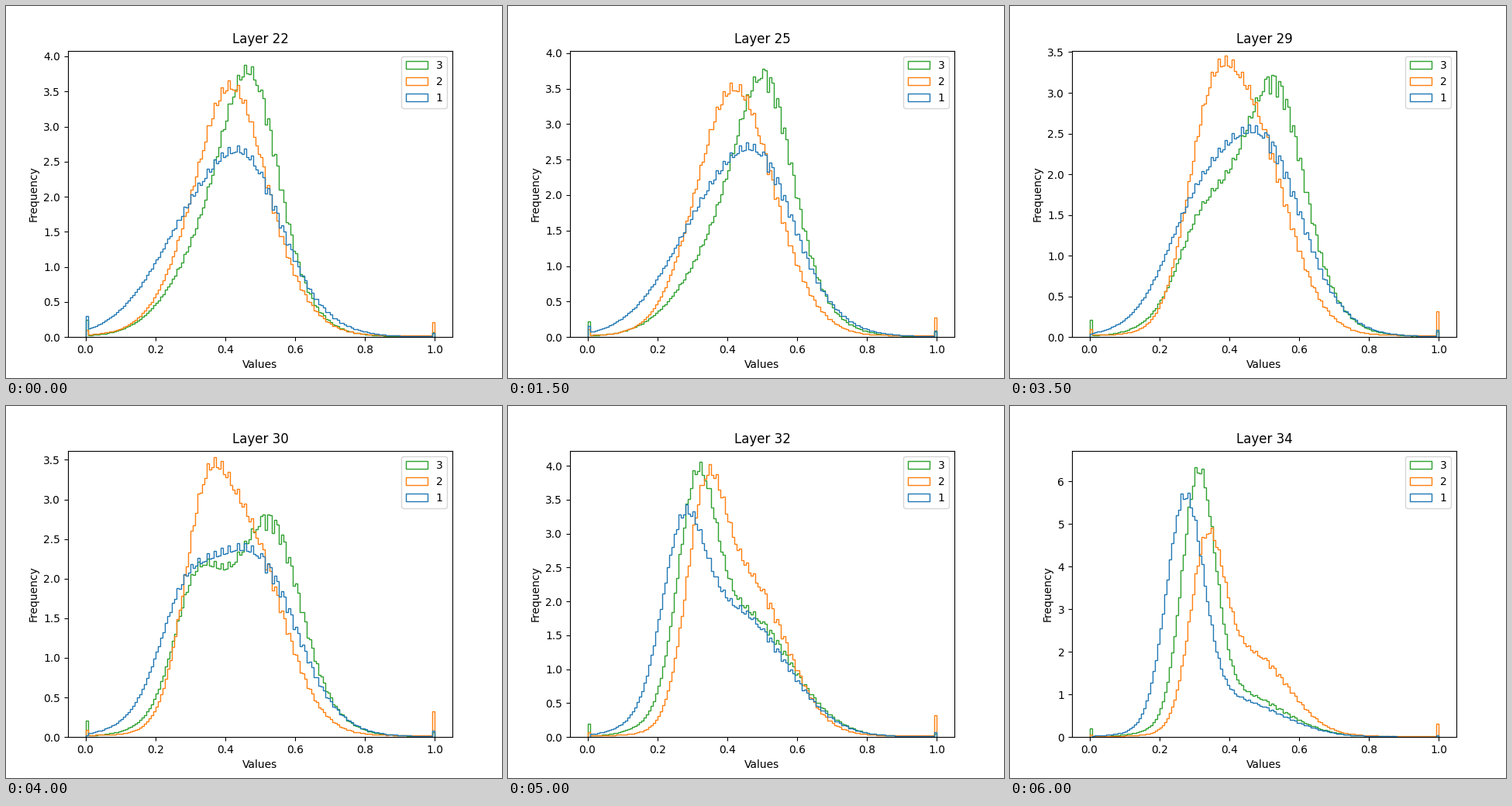
A matplotlib script that plays this animation: 640x480 px, repeating every 6.5 s.

```python
import numpy as np
import matplotlib.pyplot as plt
from matplotlib.animation import FuncAnimation

BINS = 150
MIDS = (np.arange(BINS) + 0.5) / BINS
FIRST, MIDDLE, LAST = 22, 28, 34

# Upper limit of the y axis at a few layers
TOP_LAYERS = [22, 24, 27, 29, 30, 32, 34]
TOPS = [4.081, 4.071, 3.962, 3.518, 3.616, 4.224, 6.726]

# Each series mixes a sharp early bump, a broad bump and a late bump.
# Triples hold a value at the first, middle and last layer.
SERIES = {
    "1": dict(early_share=.12, fade=4, early_mu=(.48, .535, .54), early_sd=.08,
              broad_mu=(.39, .43, .40), broad_sd=(.155, .15, .14),
              late_share=.68, onset=27, growth=2.2, late_mu=.272, late_sd=.053,
              floor=.01, left=(.30, .06, .01), right=(.06, .09, .04)),
    "2": dict(early_share=.25, fade=1, early_mu=(.415, .43, .44), early_sd=.08,
              broad_mu=(.415, .445, .46), broad_sd=(.125, .115, .107),
              late_share=.47, onset=22, growth=1.5, late_mu=.335, late_sd=.048,
              floor=.025, left=(.10, .10, .05), right=(.21, .31, .32)),
    "3": dict(early_share=.39, fade=4, early_mu=(.475, .535, .545), early_sd=.074,
              broad_mu=(.42, .46, .42), broad_sd=(.132, .14, .13),
              late_share=.66, onset=27, growth=1.7, late_mu=.311, late_sd=.047,
              floor=.01, left=(.24, .21, .20), right=(.07, .07, .04)),
}


def half_float_ripple():
    """Relative count of half-precision numbers that fall in each bin."""
    vals = np.arange(0x3C00, dtype=np.uint16).view(np.float16)
    gaps = np.spacing(vals).astype(float)
    total, _ = np.histogram(vals.astype(float), BINS, (0, 1), weights=gaps)
    return total * BINS


RIPPLE = half_float_ripple()


def glide(layer, triple):
    """Parabola through the first, middle and last value."""
    a, b, c = triple
    s = (layer - MIDDLE) / (LAST - MIDDLE)
    return b + s * (c - a) / 2 + s**2 * ((a + c) / 2 - b)


def bump(share, mu, sd):
    z = (MIDS - mu) / sd
    return share * np.exp(-z**2 / 2) / (sd * np.sqrt(2 * np.pi))


def density(layer, p):
    gone = min((layer - FIRST) / 10, 1)
    early = p["early_share"] * (1 - gone**p["fade"])
    grown = max(layer - p["onset"], 0) / (LAST - p["onset"])
    late = p["late_share"] * grown**p["growth"]
    late_sd = p["late_sd"] + .003 * (LAST - layer)

    dens = bump(early, glide(layer, p["early_mu"]), p["early_sd"])
    dens += bump(late, p["late_mu"], late_sd)
    dens += bump(1 - early - late, glide(layer, p["broad_mu"]),
                 glide(layer, p["broad_sd"]))
    dens = (dens + p["floor"]) / (1 + p["floor"]) * RIPPLE
    dens[0] = glide(layer, p["left"])
    dens[-1] = glide(layer, p["right"])
    return dens


fig, ax = plt.subplots(figsize=(6.4, 4.8), dpi=100)


def draw(frame):
    layer = FIRST + frame
    ax.clear()
    ax.hist([MIDS] * len(SERIES), bins=BINS, range=(0, 1), histtype="step",
            weights=[density(layer, p) for p in SERIES.values()],
            label=list(SERIES))
    ax.set_ylim(0, np.interp(layer, TOP_LAYERS, TOPS))
    ax.set_title(f"Layer {layer}", pad=6.7)
    ax.set_xlabel("Values")
    ax.set_ylabel("Frequency")
    ax.legend(loc="upper right")
    return []


anim = FuncAnimation(fig, draw, frames=LAST - FIRST + 1, init_func=lambda: [],
                     interval=500, repeat=True, repeat_delay=0)
plt.show()
```
